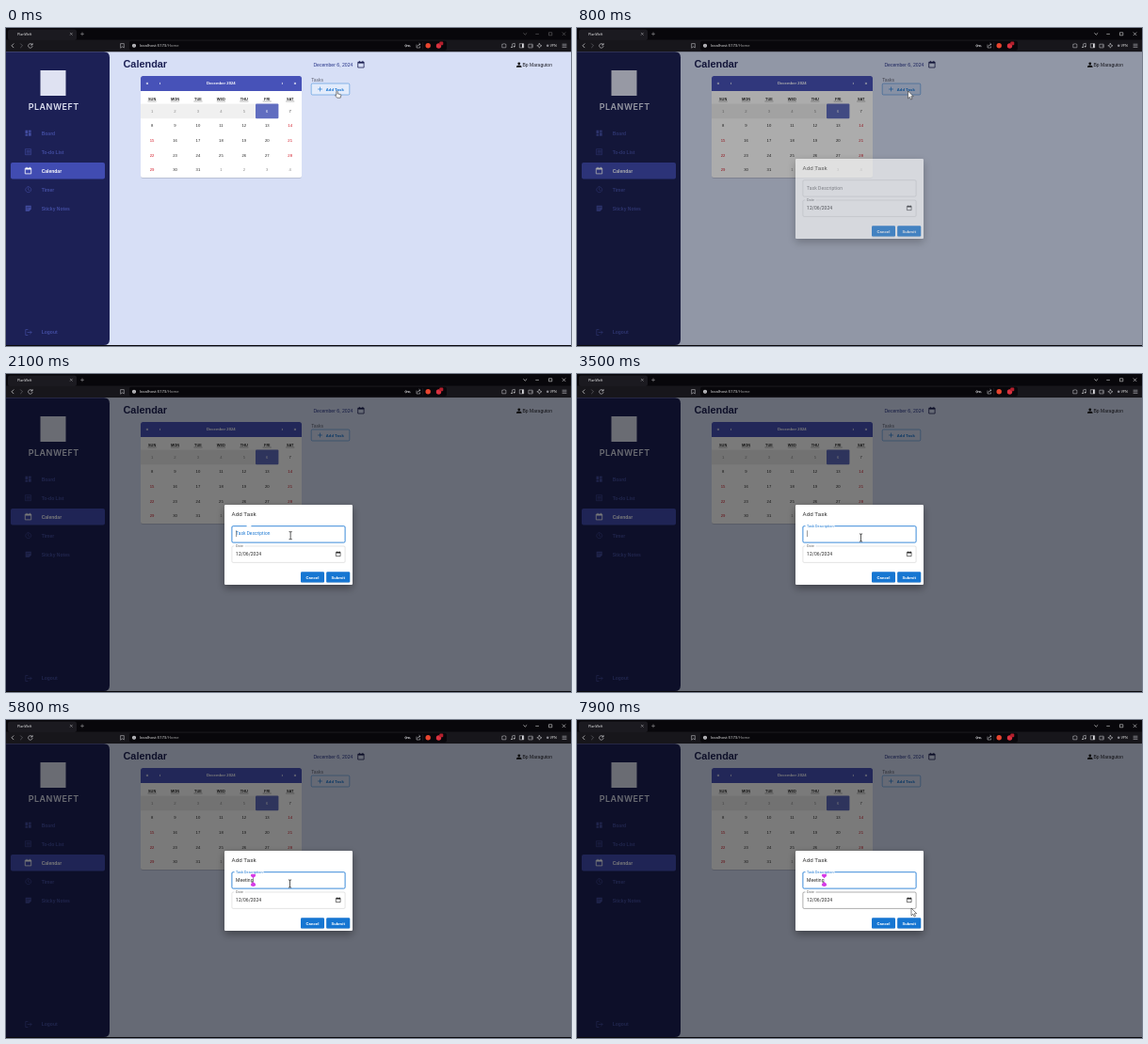
An HTML page that plays this animation: 600 px wide and 338 px high, repeating every 8 s.

```html
<!DOCTYPE html>
<html lang="en">
<head>
<meta charset="utf-8">
<title>Task calendar</title>
<style>
  html, body { margin: 0; width: 100%; height: 100%; overflow: hidden; background: #09080c; }
  svg { display: block; width: 100vw; height: 100vh; }
  text { font-family: "Liberation Sans", Arial, sans-serif; font-size: 5px; white-space: pre; }
  .mui text { font-family: Roboto, sans-serif; letter-spacing: .0094em; fill: #2b2b2b; }
  .mui text.btn { font-size: 4.375px; font-weight: 600; letter-spacing: .02857em; }
  .chrome text { font-family: "Open Sans", "Noto Sans", sans-serif; font-size: 4.2px; fill: #eee; }
  .line { fill: none; stroke: currentColor; stroke-linecap: round; stroke-linejoin: round; }
  .bold { font-weight: 700; }
  .mid { text-anchor: middle; }
</style>
</head>
<body>
<svg id="stage" viewBox="0 0 600 338" preserveAspectRatio="none" xmlns="http://www.w3.org/2000/svg"></svg>
<script>
const LOOP = 8000, STEP = 100;
const BLUE = '#1976d2';
const stage = document.getElementById('stage');

const rect = (x, y, w, h, fill, r = 0, more = '') =>
  `<rect x="${x}" y="${y}" width="${w}" height="${h}" rx="${r}" fill="${fill}" ${more}/>`;
const text = (x, y, s, more = '') => `<text x="${x}" y="${y}" ${more}>${s}</text>`;
const line = (d, color, w = .6, more = '') =>
  `<path class="line" d="${d}" color="${color}" stroke-width="${w}" ${more}/>`;
const dot = (x, y, r, fill) => `<circle cx="${x}" cy="${y}" r="${r}" fill="${fill}"/>`;

// Small calendar glyph with its top left corner at x, y
const calIcon = (x, y, s, color) => `<g transform="translate(${x} ${y}) scale(${s})">` +
  line('M.5 1.2H6.5V7H.5ZM1.8 .3V1M5.2 .3V1', color, .8) + rect(.5, 1, 6, 1.6, color) + '</g>';

function browser() {
  const c = '#d8d8dc';
  return `<g class="chrome">` +
    rect(0, 0, 600, 13, '#08070b') + rect(0, 12.5, 600, 13, '#17161b') +
    rect(2, 1.5, 73, 11.5, '#1b1a20', 2.5) +
    text(12, 7.9, 'PlanWeft', 'style="font-size:3.7px"') +
    line('M68.2 5.2l2.2 2.2m0-2.2l-2.2 2.2', c, .4) + line('M79.5 6.3h3M81 4.8v3', c, .4) +
    `<g id="winctl">` + line('M549.7 5.6l1.6 1.5 1.6-1.5', '#fff') +
    line('M562.7 6.4h2.8M576.8 4.8h3v3h-3zM591 4.8l3 3m0-3l-3 3', '#fff', .5) + '</g>' +
    line('M8 16.8L6 18.8l2 2', c, .7) + line('M15.5 16.8l2 2-2 2', '#68676e', .7) +
    line('M27.8 17.6A2.3 2.3 0 1 0 28.1 19.6M28.1 16.4V18H26.5', c) +
    line('M122 16.6h3.3v4.4l-1.65-1.2L122 21z', c, .5) +
    rect(131, 13.8, 337, 10, '#08070b', 2) +
    dot(136, 18.8, 2, '#d8d8dc') + line('M136 18.6v1.1M136 17.7v.05', '#111', .5) +
    text(142, 20.3, 'localhost:5173<tspan fill="#aaa">/Home</tspan>') +
    `<circle cx="424.7" cy="18.8" r="1" fill="none" stroke="${c}" stroke-width=".6"/>` +
    line('M425.8 18.8h3.2v1M427.5 18.8v.8', c) +
    line('M436 18v3h3.6v-1.2M437 19.3q.5-2 2.8-2M438.8 16.3l1.2 1-1.2 1', c, .5) +
    line('M442.7 15.5v6.6', '#39383f', .4) +
    dot(448.2, 18.7, 2.7, '#e8452f') + dot(459.5, 19, 2.7, '#d8313f') +
    rect(460.3, 14.6, 4, 3.6, '#b3202d', 1) +
    line('M527.2 17.2h1.1q.7-1.5 1.4 0h1.2v3.6h-3.7z', c, .5) +
    line('M537.6 20.3v-3.4l2.7-.6v3.2', c, .5) + dot(537, 20.4, .7, c) + dot(539.7, 19.7, .7, c) +
    line('M545.7 16.7h4v4.2h-4z', c, .5) + rect(548, 16.7, 1.7, 4.2, c) +
    line('M555.3 17.2h3.9v3.7h-3.9zM557.8 19h1.4', c, .5) +
    line('M566.4 16.4l.8 1.7 1.8.7-1.8.7-.8 1.7-.8-1.7-1.8-.7 1.8-.7z', c, .5) +
    dot(575.2, 18.8, 1.3, '#8a8990') + text(577.7, 20.1, 'VPN', 'style="font-size:3.6px"') +
    line('M591 17.2h4M591 18.8h4M591 20.4h4', c, .5) + '</g>';
}

function sidebar() {
  const dim = '#424ca0';
  const icons = [
    y => rect(20.5, y - 3, 2.7, 3.4, dim) + rect(20.5, y + 1, 2.7, 2, dim) +
      rect(24, y - 3, 2.7, 2, dim) + rect(24, y - .4, 2.7, 3.4, dim),
    y => line(`M20.8 ${y - 3}h5.8v6h-5.8zM22 ${y - 1.3}h3.4M22 ${y}h3.4M22 ${y + 1.3}h3.4`, dim),
    y => calIcon(20.2, y - 3.8, 1, '#fff'),
    y => line(`M23.7 ${y - 3}a3 3 0 1 0 .01 0M23.7 ${y - 1.6}v1.8l1.2.8`, dim),
    y => `<path d="M20.7 ${y - 3}h6v3.9l-2.1 2.1h-3.9z" fill="${dim}"/>` +
      line(`M22 ${y - 1.2}h3.4M22 ${y + .4}h2`, '#1c2054', .5)
  ];
  const names = ['Board', 'To-do List', 'Calendar', 'Timer', 'Sticky Notes'];
  let s = `<path d="M0 25.3H104Q110 25.3 110 31.3V331Q110 337 104 337H0Z" fill="#1c2055"/>` +
    rect(36.5, 45, 27, 27, '#dfe2f2') +
    text(50.7, 86.8, 'PLANWEFT', 'class="mid" fill="#dfe2f2" style="font:600 9px Inter,sans-serif;letter-spacing:.5px"') +
    rect(5, 143, 100, 17.5, '#414cb2', 2);
  names.forEach((n, i) => {
    const y = 111.7 + 20 * i;
    s += icons[i](y) + text(37.7, y + 1.8, n, `class="bold" fill="${i == 2 ? '#fff' : dim}"`);
  });
  return s + line('M23 320.5h-2.2v6H23M23 323.5h4M25.6 322l1.5 1.5-1.5 1.5', dim, .7) +
    text(37.7, 325.3, 'Logout', `class="bold" fill="${dim}"`);
}

function calendar() {
  const col = i => 155.1 + 24.43 * i, row = i => 88.3 + 15.65 * i;
  let s = rect(143, 51, 171, 108, '#fff', 2.5, 'filter="url(#soft)"') +
    `<path d="M143 67V53.5Q143 51 145.5 51H311.5Q314 51 314 53.5V67Z" fill="#4752b8"/>` +
    text(228.3, 59.9, 'December 2024', 'class="mid bold" fill="#fff" style="font-size:4.2px"');
  [[150, '«'], [163.5, '‹'], [293.3, '›'], [307, '»']].forEach(([x, c]) =>
    s += text(x, 60, c, 'class="mid bold" fill="#fff"'));
  s += rect(143, 80.6, 122, 15.6, '#f0f0f0') + rect(265, 80.6, 24.4, 15.6, '#606dc0', 1);
  ['SUN', 'MON', 'TUE', 'WED', 'THU', 'FRI', 'SAT'].forEach((d, i) =>
    s += text(col(i), 77, d, 'class="mid bold" fill="#222" style="font-size:3.9px"') +
      line(`M${col(i) - 4.2} 78h8.4`, '#333', .35));
  for (let i = 0; i < 35; i++) {
    const day = i % 31 + 1, wd = i % 7;
    let color = '#222';
    if (i < 5) color = '#888';
    else if (i == 5) color = '#fff';
    else if (i > 30) color = '#858585';
    else if (i > 8 && (wd == 0 || wd == 6)) color = '#d10f1d';
    s += text(col(wd), row(Math.floor(i / 7)) + 1.5, day, `class="mid" fill="${color}" style="font-size:4.2px"`);
  }
  return s;
}

function page() {
  return rect(0, 25.3, 600, 311.7, '#d7dff6') + sidebar() +
    text(124.5, 42.3, 'Calendar', 'class="bold" fill="#1c2054" style="font-size:10.9px"') +
    text(326.4, 40.6, 'December 6, 2024', 'fill="#263388" style="font-size:5.1px"') +
    calIcon(373.6, 35, 1, '#1c2054') +
    dot(544.8, 37.8, 1.4, '#111') + `<path d="M542 41.8v-.8q0-1.5 2.8-1.5t2.8 1.5v.8z" fill="#111"/>` +
    text(548.5, 40.7, 'Bp Maraguton', 'fill="#1b1b22"') +
    calendar() + text(324.2, 56.7, 'Tasks', 'fill="#5c6070"') +
    `<g class="mui">` + rect(324.2, 59, 40.6, 12, '#e2ebfb', 1.25, 'id="add"') +
    `<g clip-path="url(#addclip)"><circle id="ripple" cx="351" cy="67" fill="${BLUE}"/></g>` +
    rect(324.2, 59, 40.6, 12, 'none', 1.25, `stroke="${BLUE}" stroke-width=".45"`) +
    line('M331.5 65h4M333.5 63v4', BLUE, .65) +
    text(339.8, 66.7, 'Add Task', `class="btn" style="fill:${BLUE}"`) + '</g>';
}

function dialog() {
  const button = (id, x, label) => rect(x, 210.3, 25, 11.3, BLUE, 1.25, `id="${id}" filter="url(#soft)"`) +
    text(x + 12.55, 217.5, label, 'class="btn mid" style="fill:#fff"');
  const field = (id, y) => rect(239.9, y, 120.2, 17.4, 'none', 1.25, `id="${id}" stroke-width=".4"`);
  return `<g id="dialog" class="mui">` +
    rect(232, 139, 136, 85, '#fff', 1.25, 'filter="url(#deep)"') +
    text(239.5, 151.1, 'Add Task', 'style="font-size:6.25px"') +
    field('task', 161.7) + rect(242.5, 160.8, 31, 2, '#fff', 0, 'id="notch"') +
    text(0, 0, 'Task Description', 'id="label"') +
    text(244.1, 172.1, '', 'id="typed"') + rect(0, 166.3, .45, 6.8, '#222', 0, 'id="caret"') +
    field('date', 183) + rect(242.5, 182, 11, 2, '#fff') +
    text(244.1, 184.3, 'Date', 'style="font-size:3.75px;fill:#666"') +
    text(244.1, 193.1, '12/06/2024') + calIcon(350.4, 188.6, .72, '#111') +
    button('cancel', 313, 'Cancel') + button('submit', 340.2, 'Submit') +
    `<path id="grip" fill="#d63be6" d="M-2.7 -4.7A1.6 1.6 0 0 1 -1.2 -6H1.2A1.6 1.6 0 0 1 2.7 -4.7Q2.4 -2.8 .5 -2.3V-1.7H-.5V-2.3Q-2.4 -2.8 -2.7 -4.7ZM-2.7 5.4Q-2.4 3.3 -.5 2.9V2.2H.5V2.9Q2.4 3.3 2.7 5.4Q2.4 7.2 0 7.2Q-2.4 7.2 -2.7 5.4Z"/></g>`;
}

const pointers = `<g id="pointer" stroke-linejoin="round">
  <path id="arrow" fill="#fff" stroke="#222" stroke-width=".55" d="M0 0V7.9L1.9 6.2 3.1 9 4.5 8.4 3.3 5.7H5.7Z"/>
  <path id="hand" fill="#fff" stroke="#222" stroke-width=".55" d="M-.7 .5Q0 -.4 .7 .5V2.9L3.7 3.5Q4.4 3.8 4.3 4.6L3.7 7.2H.1L-2 4.7Q-1.9 3.7 -.7 4.4Z"/>
  <path id="beam" fill="none" stroke="#111" stroke-width=".7" d="M-1.6 -4H-.5Q0 -4 0 -3.5Q0 -4 .5 -4H1.6M0 -3.5V3.5M-1.6 4H-.5Q0 4 0 3.5Q0 4 .5 4H1.6"/></g>`;

stage.innerHTML = `<defs>
  <filter id="soft" x="-10%" y="-10%" width="120%" height="130%"><feDropShadow dx="0" dy=".6" stdDeviation=".6" flood-opacity=".22"/></filter>
  <filter id="deep" x="-20%" y="-20%" width="140%" height="150%"><feDropShadow dx="0" dy="3.4" stdDeviation="4" flood-opacity=".38"/></filter>
  <clipPath id="addclip"><rect x="324.2" y="59" width="40.6" height="12" rx="1.25"/></clipPath></defs>` +
  browser() + page() + rect(0, 25.3, 600, 311.7, '#000', 0, 'id="shade"') + dialog() + pointers +
  rect(0, 337, 600, 1, '#09080c');

const el = {};
stage.querySelectorAll('[id]').forEach(n => el[n.id] = n);
const set = (n, attrs) => { for (const k in attrs) n.setAttribute(k, attrs[k]); };
const show = (n, on) => n.setAttribute('visibility', on ? 'inherit' : 'hidden');

const clamp = v => Math.min(1, Math.max(0, v));
const ease = v => v * v * (3 - 2 * v);
const ramp = (t, start, len) => ease(clamp((t - start) / len));

const OPEN = 690, FOCUS = 2100, BLINK = 500;
const WORD = 'Meeting', FIRST_KEY = 3600, LAST_KEY = 4350;
const KEY_GAP = (LAST_KEY - FIRST_KEY) / (WORD.length - 1);

// time, x, y
const path = [
  [0, 351.5, 67], [1250, 351.5, 67], [1900, 304, 165], [2200, 301.5, 174],
  [6050, 301.5, 174], [6700, 352, 214], [7300, 353, 213], [7800, 355, 207], [7900, 355, 200]
];

function pointerAt(t) {
  let i = path.findIndex(p => p[0] > t);
  if (i < 0) return path[path.length - 1].slice(1);
  const [t0, x0, y0] = path[i - 1], [t1, x1, y1] = path[i];
  const k = ease((t - t0) / (t1 - t0));
  return [x0 + (x1 - x0) * k, y0 + (y1 - y0) * k];
}

function draw(t) {
  const [x, y] = pointerAt(t);
  const over = (l, top, r, b) => x >= l && x <= r && y >= top && y <= b;
  const modal = t >= 800;
  const onTask = modal && over(240, 162, 360, 179);
  const onDate = modal && over(240, 183, 360, 200.5);
  const onSubmit = modal && over(340, 210, 365, 222);

  set(el.winctl, { opacity: t < 100 ? .45 : 1 });
  set(el.add, { 'fill-opacity': modal ? 0 : 1 });
  set(el.ripple, { r: 30 * ramp(t, 550, 150), opacity: .16 * (1 - ramp(t, 700, 200)) });

  // Modal fade
  const fade = clamp((t - OPEN) / 225), k = 1 - Math.pow(1 - ease(fade), 1.5);
  set(el.shade, { opacity: .52 * k });
  set(el.dialog, { opacity: k });
  show(el.dialog, modal);

  // Text field
  const focus = t >= FOCUS, lift = ramp(t, FOCUS - 50, 200);
  set(el.task, {
    stroke: focus ? BLUE : onTask ? '#222' : '#bbb',
    'stroke-width': focus ? .85 : .4
  });
  set(el.notch, { transform: `translate(${258 * (1 - lift)} 0) scale(${lift} 1)` });
  set(el.label, { transform: `translate(244.1 ${172 - 9 * lift}) scale(${1 - .25 * lift})` });
  el.label.style.fill = focus ? BLUE : '#707070';
  set(el.date, { stroke: onDate ? '#333' : '#bbb' });
  set(el.submit, { fill: onSubmit ? '#1565c0' : BLUE });

  const count = t < FIRST_KEY ? 0 : Math.min(WORD.length, 1 + Math.floor((t - FIRST_KEY) / KEY_GAP));
  el.typed.textContent = WORD.slice(0, count);
  const end = 244.1 + (count ? el.typed.getComputedTextLength() : 0);
  const typing = t >= FIRST_KEY && t < LAST_KEY;
  const since = t - (t < LAST_KEY ? FOCUS : LAST_KEY);
  set(el.caret, { x: end });
  show(el.caret, focus && (typing || since % (2 * BLINK) < BLINK));
  set(el.grip, { transform: `translate(${end} 169.8)` });
  show(el.grip, count > 0);

  // Pointer shape follows what lies below it
  const hand = !modal || onSubmit;
  set(el.pointer, { transform: `translate(${x} ${y})` });
  show(el.hand, hand);
  show(el.beam, onTask);
  show(el.arrow, !hand && !onTask);
}

function tick() {
  const t = performance.now() % LOOP;
  draw(Math.floor(t / STEP) * STEP);
  requestAnimationFrame(tick);
}
tick();
</script>
</body>
</html>
```
